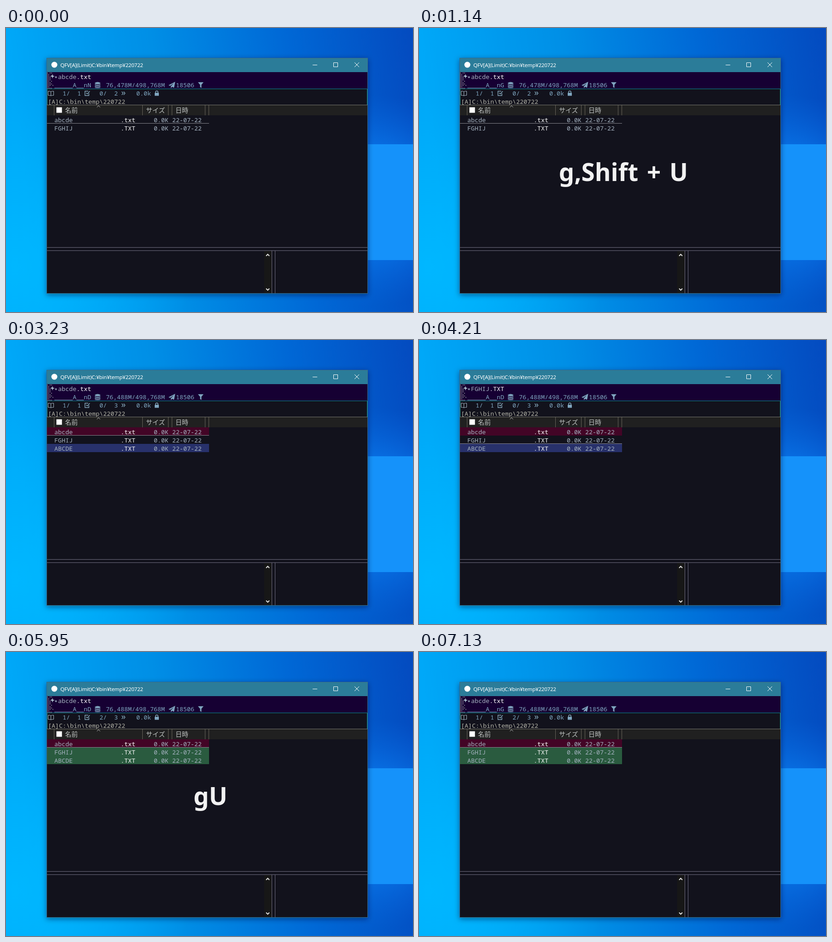
An HTML page that plays this animation: 884x618 px, repeating every 8 s.

```html
<!DOCTYPE html>
<html lang="ja">
<head>
<meta charset="utf-8">
<title>File list</title>
<style>
html, body { margin: 0; width: 884px; height: 618px; overflow: hidden; background: #0078d7; }
svg { display: block; }
text { white-space: pre; font: 13.333px "Noto Sans Mono", "DejaVu Sans Mono", monospace; fill: #a5b2c0; }
.ui { font: 11.6px "Noto Sans", "Open Sans", sans-serif; letter-spacing: -.24px; fill: #fff; }
.jp { font: 14px "Noto Sans CJK JP", "Noto Sans CJK", sans-serif; fill: #bfc3c2; }
.big { font: bold 53px "Noto Sans", "Open Sans", sans-serif; word-spacing: 5px; fill: #f2f2f2; text-anchor: middle; }
.ext { fill: #fff; }
.info text, .info .icon { fill: #7fa5bf; }
.line { fill: none; stroke-width: 1; }
</style>
</head>
<body>
<svg width="884" height="618" viewBox="0 0 884 618">
  <defs>
    <linearGradient id="sky" x2="1" y2="-.08">
      <stop offset="0" stop-color="#00a8f8"/>
      <stop offset=".35" stop-color="#008fe6"/>
      <stop offset=".68" stop-color="#0068d6"/>
      <stop offset="1" stop-color="#044abf"/>
    </linearGradient>
    <radialGradient id="left" gradientUnits="userSpaceOnUse" cx="20" cy="520" r="380">
      <stop offset="0" stop-color="#00b7ff"/>
      <stop offset="1" stop-color="#00b7ff" stop-opacity="0"/>
    </radialGradient>
    <radialGradient id="glow" gradientUnits="userSpaceOnUse" cx="800" cy="375" r="230">
      <stop offset="0" stop-color="#0a84f5"/>
      <stop offset=".5" stop-color="#0a78ec" stop-opacity=".7"/>
      <stop offset="1" stop-color="#0868e0" stop-opacity="0"/>
    </radialGradient>
    <filter id="shadow" x="-10%" y="-10%" width="120%" height="120%">
      <feDropShadow dx="0" dy="3" stdDeviation="6" flood-color="#001030" flood-opacity=".5"/>
    </filter>
  </defs>

  <rect width="884" height="618" fill="url(#sky)"/>
  <rect width="884" height="618" fill="url(#left)"/>
  <rect width="884" height="618" fill="url(#glow)"/>
  <rect x="690" y="253" width="252" height="252" fill="#1592fa"/>

  <!-- window frame and title bar -->
  <rect x="88" y="65" width="698" height="513" fill="#3b6c86" filter="url(#shadow)"/>
  <rect x="89" y="66" width="696" height="30" fill="#2b7c99"/>
  <circle cx="105" cy="80" r="6.5" fill="#fff"/>
  <text class="ui" x="118" y="85">QFV[A](Limit)C:¥bin¥temp¥220722</text>
  <path class="line" stroke="#fff" d="M666 80.5h10M711.5 75.5h9v9h-9zM757 75l10 10m0-10l-10 10"/>
  <rect x="89" y="96" width="696" height="481" fill="#12121c"/>

  <!-- info area -->
  <rect x="89" y="96" width="696" height="36" fill="#160033"/>
  <g id="dots" fill="#8d8a98"></g>
  <path fill="#a9bccb" d="M101 100l1.2 3.8 3.8 1.2-3.8 1.2-1.2 3.8-1.2-3.8-3.8-1.2 3.8-1.2zM108.500 104l.8 2.200 2.200.8-2.200.8-.8 2.200-.8-2.200-2.200-.8 2.200-.8z"/>
  <text id="name" x="113" y="111"></text>
  <text id="ext" class="ext" x="153" y="111"></text>
  <g class="info">
    <text id="mode" x="105" y="129"></text>
    <text id="free" x="217" y="129"></text>
    <text x="369" y="129">18506</text>
    <path class="icon" d="M193 119.500q6-4 12 0v1.500q-6 3-12 0zM193 122.500q6 3 12 0v2q-6 3-12 0zM193 126q6 3 12 0v2q-6 3-12 0zM193 129q6 3 12 0v1q-6 2.500-12 0z"/>
    <path class="icon" d="M367.500 117l-2.500 13-4.500-2-2.500 3v-4l6.500-7-8 6-3.500-1.500z"/>
    <path class="icon" d="M417 118h12l-4.500 5.500v7l-3-2v-5z"/>
    <text x="123" y="147">1/  1</text>
    <text id="marks" x="203" y="147"></text>
    <text x="283" y="147">0.0k</text>
    <path class="line" stroke="#a5b8c6" stroke-width="1.300" d="M97.500 138.500q-3-1.500-6-1v9q3-.5 6 1 3-1.500 6-1v-9q-3-.5-6 1zv9"/>
    <path class="line" stroke="#86a9bd" style="stroke-width:1.400" d="M180 142v5h-8.500v-9.500h7M174 141l2.500 2.500 5.500-6M251.500 138.500l3 3.500-3 3.500M255.500 138.500l3 3.500-3 3.500"/>
    <path class="icon" d="M323 141h9v6.500h-9z"/>
    <path class="line" stroke="#86a9bd" style="stroke-width:1.500" d="M325 141v-2q0-2 2.500-2t2.500 2v2"/>
  </g>
  <g id="prefix">
    <rect x="89" y="133" width="9" height="17" fill="#12121c"/>
    <text x="90" y="147">g</text>
  </g>
  <text x="91" y="165" fill="#b4b4a8" style="fill:#b4b4a8">[A]C:\bin\temp\220722</text>
  <path class="line" stroke="#0b8a8c" d="M89.500 167v-34.500h695V167"/>
  <path class="line" stroke="#77776e" d="M89 167.500h696"/>

  <!-- column header -->
  <rect x="89" y="168" width="696" height="22" fill="#202020"/>
  <path class="line" stroke="#68635a" d="M104.500 168v22m192-22v22m56-22v22m8-22v22m72-22v22m8-22v22"/>
  <rect x="109.500" y="172.500" width="12" height="12" fill="#fff"/>
  <path class="line" stroke="#c0c0c0" d="M197.500 172.500l3.500-3.500 3.500 3.500"/>
  <text class="jp" x="128" y="184">名前</text>
  <text class="jp" x="304" y="184">サイズ</text>
  <text class="jp" x="368" y="184">日時</text>

  <g id="rows"></g>
  <path id="cursor" class="line" stroke="#85858c" d="M89 207.500h352"/>

  <!-- lower panes -->
  <rect x="561" y="485" width="16" height="92" fill="#171717"/>
  <path class="line" stroke="#6f6d80" d="M89 477.500h696M89 484.500h696M577.500 485v92m7-92v92"/>
  <path class="line" stroke="#e0e0e0" style="stroke-width:2" d="M565 496l3.500-3.500 3.500 3.500M565 567l3.500 3.500 3.500-3.500"/>

  <text id="caption" class="big" x="444" y="333"></text>
</svg>

<script>
const LOOP = 8000;
const FILES = [["abcde", ".txt"], ["FGHIJ", ".TXT"], ["ABCDE", ".TXT"]];
const NONE = "none", RED = "#430526", BLUE = "#28316b", GREEN = "#2a5b3f";

// Each step changes part of the state from its time on.
const STEPS = [
  [0, { caption: "", prefix: false, mode: "N", free: "76,478", count: 2, marks: 0, cursor: 0, fills: [NONE, NONE, NONE] }],
  [500, { caption: "g,Shift + U" }],
  [720, { prefix: true }],
  [1140, { prefix: false, mode: "G" }],
  [1700, { caption: "" }],
  [3230, { mode: "D", free: "76,488", count: 3, fills: [RED, NONE, BLUE] }],
  [4210, { cursor: 1 }],
  [4620, { cursor: 2, marks: 1, fills: [RED, GREEN, BLUE] }],
  [4840, { cursor: 0, marks: 2, fills: [RED, GREEN, GREEN] }],
  [5950, { caption: "gU" }],
  [6150, { prefix: true }],
  [6370, { prefix: false, mode: "G" }],
  [7130, { caption: "" }],
];

const $ = id => document.getElementById(id);
const setText = (id, value) => { $(id).textContent = value; };

$("rows").innerHTML = FILES.map(([name, ext], i) => `
  <g transform="translate(0 ${i * 18})">
    <rect x="89" y="190" width="352" height="18"/>
    <text x="105" y="205">${name}</text>
    <text class="ext" x="249" y="205">${ext}</text>
    <text x="321" y="205">0.0K 22-07-22</text>
  </g>`).join("");
const rows = [...$("rows").children];

// Speckle that thins out to the right.
let seed = 7;
const random = () => (seed = seed * 16807 % 2147483647) / 2147483647;
let speckle = "";
for (let y = 97; y < 131; y += 3) {
  for (let x = 89; x < 104; x += 3) {
    if (random() < 1.15 - (x - 89) / 12) speckle += `<rect x="${x}" y="${y}" width="1.7" height="1.7"/>`;
  }
}
$("dots").innerHTML = speckle;

function draw(time) {
  const s = Object.assign({}, ...STEPS.filter(([at]) => at <= time).map(([, change]) => change));
  const [name, ext] = FILES[s.cursor];
  setText("name", name);
  setText("ext", ext);
  setText("mode", "_____A__n" + s.mode);
  setText("free", s.free + "M/498,768M");
  setText("marks", `${s.marks}/  ${s.count}`);
  setText("caption", s.caption);
  $("prefix").style.display = s.prefix ? "" : "none";
  $("cursor").setAttribute("transform", `translate(0 ${s.cursor * 18})`);
  rows.forEach((row, i) => {
    row.style.display = i < s.count ? "" : "none";
    row.firstElementChild.setAttribute("fill", s.fills[i]);
  });
}

function tick() {
  draw((performance.now() - start) % LOOP);
  requestAnimationFrame(tick);
}
const start = performance.now();
tick();
</script>
</body>
</html>
```
